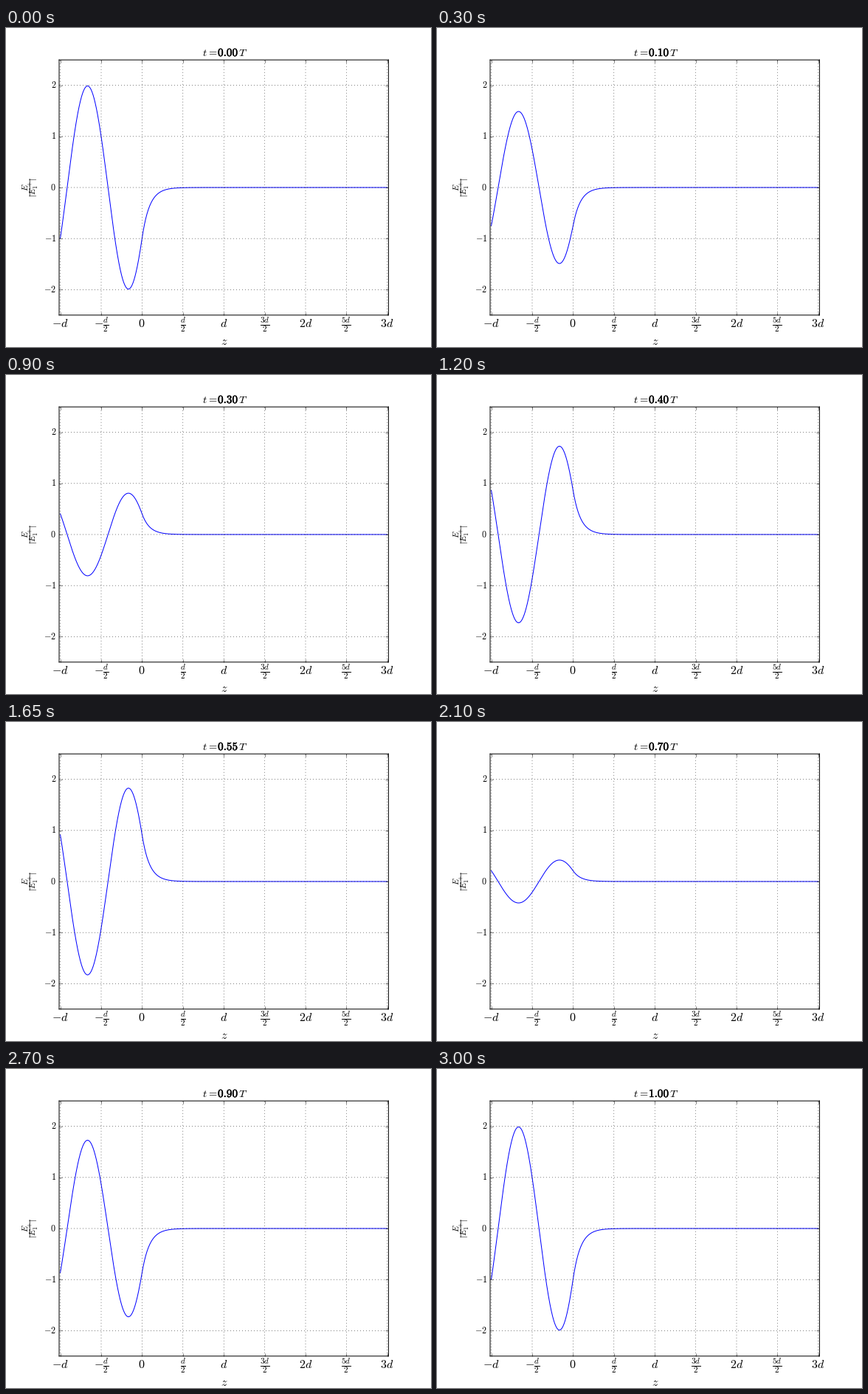
These frames come from a looping animation (576 px wide and 432 px high, 3150 ms). A matplotlib script:

```python
import numpy as np
import matplotlib.pyplot as plt
from matplotlib.animation import FuncAnimation
from matplotlib.lines import Line2D
from matplotlib.patheffects import withStroke

FRAMES, STEP_MS = 21, 150
PHASE = 0.1024            # phase of the standing wave at t = 0
KAPPA = 2 * np.pi * np.sqrt(3)

plt.style.use("classic")
plt.rcParams.update({"mathtext.fontset": "cm", "font.family": "DejaVu Serif",
                     "path.snap": False})

fig = plt.figure(figsize=(8, 6), dpi=72, facecolor="white")
ax = fig.add_axes([0.125, 0.1, 0.775, 0.8])
ax.set_xlim(-1.0145, 3.0145)
ax.set_ylim(-2.5, 2.5)
ax.grid(True)

ax.set_xticks(np.arange(-1, 3.1, 0.5), labels=[])
ax.set_yticks(range(-2, 3), labels=[f"${v}$" for v in range(-2, 3)])


def label(x, y, text, size=16, **kw):
    """Place text at stage pixels, y measured from the top."""
    kw = {"ha": "center", "va": "baseline", **kw}
    return fig.text(x / 576, 1 - y / 432, text, fontsize=size, **kw)


X_LABELS = ["-d", r"-\frac{d}{2}", "0", r"\frac{d}{2}", "d",
            r"\frac{3d}{2}", "2d", r"\frac{5d}{2}", "3d"]
for i, text in enumerate(X_LABELS):
    label(73.3 + 55.4 * i, 405.3, f"${text}$")
label(295.7, 429.3, "$z$")

# Upright fraction on the y axis, turned by 90 degrees
turned = {"rotation": 90, "rotation_mode": "anchor"}
label(30, 216, "$E$", 11.2, **turned)
label(42.2, 216, "$|E_1^+|$", 11.2, **turned)
fig.add_artist(Line2D([32.2 / 576] * 2, [204.3 / 432, 227.7 / 432],
                      color="black", lw=0.7))

label(266.3, 38, r"$t\hspace{0.1}=$", 14.4, ha="left")
label(315, 38, "$T$", 14.4, ha="left")
clock = label(301.2, 38, "", 15.2,
              path_effects=[withStroke(linewidth=0.5, foreground="black")])

z = np.linspace(-1, 3, 1000)
shape = np.where(z < 0, 2 * np.cos(2 * np.pi * (z + 2 / 3)),
                 -np.exp(-KAPPA * np.maximum(z, 0)))
wave, = ax.plot(z, shape, color="blue", lw=1)


def update(i):
    t = i / 20
    wave.set_ydata(shape * np.cos(2 * np.pi * t + PHASE))
    clock.set_text(f"${t:.2f}$")
    return wave, clock


anim = FuncAnimation(fig, update, frames=FRAMES, interval=STEP_MS,
                     repeat=True, repeat_delay=0, blit=False)
plt.show()
```
